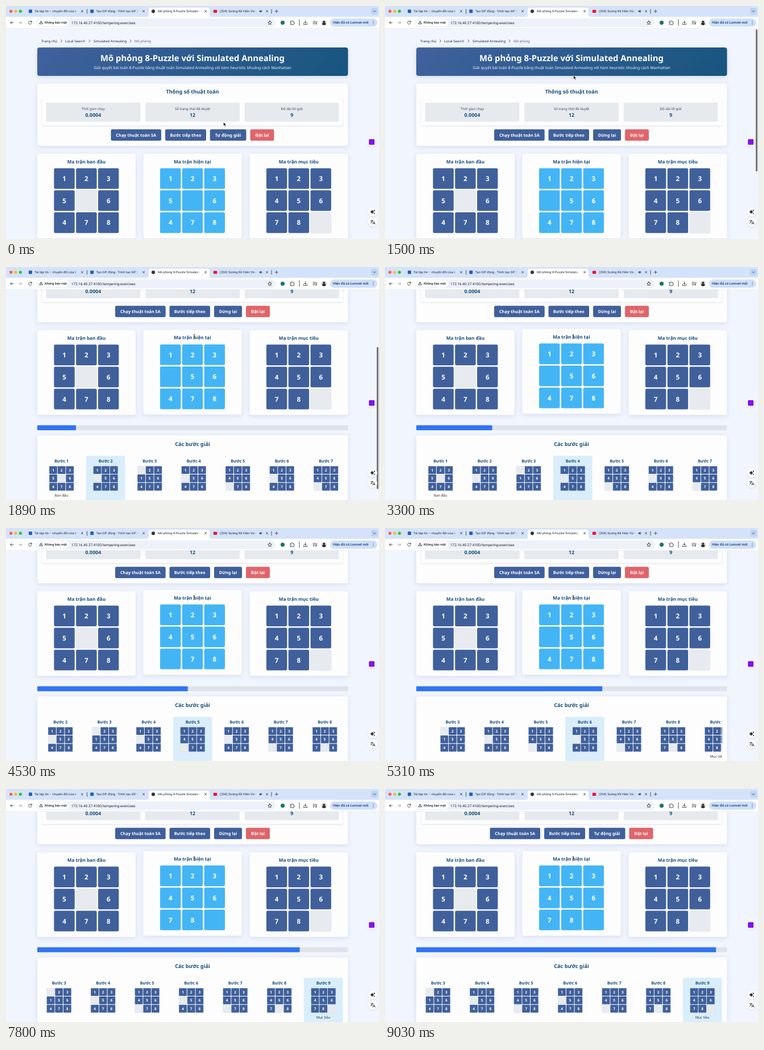
An HTML page for the animation above (9.63 s loop, 656x410 px).

```html
<!DOCTYPE html>
<html lang="vi">
<head>
<meta charset="utf-8">
<title>8-Puzzle</title>
<style>
  html, body { margin: 0; width: 100%; height: 100%; overflow: hidden; background: #f1f5fd; }
  svg { display: block; width: 656px; height: 410px; }
  text { font-family: "Noto Sans", "Open Sans", sans-serif; text-rendering: geometricPrecision; white-space: pre; }
  .ui { font-family: Roboto, Inter, sans-serif; }
  .b { font-weight: 700; }
  .m { font-weight: 500; }
  .card { filter: drop-shadow(0 2px 4px rgba(60, 95, 165, .16)); }
  .soft { filter: drop-shadow(0 1px 1.2px rgba(60, 80, 120, .16)); }
  .line { fill: none; stroke: #3c4043; stroke-width: .9; stroke-linecap: round; stroke-linejoin: round; }
</style>
</head>
<body>
<svg id="stage" viewBox="0 0 656 410" xmlns="http://www.w3.org/2000/svg"></svg>
<script>
const LOOP = 9630, FIRST = 1500, EVERY = 900, GLIDE = 330;
const NAVY = '#40609b', SKY = '#43b5f5', INK = '#174f7c', BLANK = '#e7ebf0';
const STATES = ['123506478', '123056478', '023156478', '123056478', '123456078',
  '123056478', '123456078', '123456708', '123456780'];

const rect = (x, y, w, h, fill, r = 0, more = '') =>
  `<rect x="${x}" y="${y}" width="${w}" height="${h}" rx="${r}" fill="${fill}" ${more}/>`;
const dot = (x, y, r, fill) => `<circle cx="${x}" cy="${y}" r="${r}" fill="${fill}"/>`;
const line = (d, more = '') => `<path class="line" d="${d}" ${more}/>`;
const text = (x, y, str, size, fill, cls = '', anchor = 'middle', more = '') =>
  `<text x="${x}" y="${y}" font-size="${size}" fill="${fill}" class="${cls}" text-anchor="${anchor}" ${more}>${str}</text>`;

// 3x3 board whose top-left corner is x, y
function board(x, y, state, size, pitch, font, fill, live) {
  return [...state].map((d, i) => {
    const tx = x + (i % 3) * pitch, ty = y + Math.floor(i / 3) * pitch;
    const blank = d === '0' && !live;
    const edge = blank ? `stroke="#c9d0da" stroke-width=".5" stroke-dasharray="1.4 .9"` : '';
    return rect(tx, ty, size, size, blank ? BLANK : fill, size / 16, edge) +
      text(tx + size / 2, ty + size / 2 + font * .36, d === '0' ? '' : d, font, '#fff',
        'b' + (live ? ' live' : ''));
  }).join('');
}

function boardCard(cx, title, state, fill, live) {
  return rect(cx - 86.6, 260, 173.2, 149, '#fdfdfe', 4, 'class="card"') +
    text(cx, 276.7, title, 8.17, INK, 'b') +
    board(cx - 57, 285.4, state, 36.4, 38.8, 11.6, fill, live);
}

function stat(x, label, value) {
  return rect(x, 170, 165.8, 33.5, '#e6eaef', 2) +
    text(x + 82.9, 183, label, 6, '#444b55') + text(x + 82.9, 195.2, value, 8.8, INK, 'b');
}

function buttons(id, spans, third) {
  const labels = ['Chạy thuật toán SA', 'Bước tiếp theo', third, 'Đặt lại'];
  return `<g id="${id}">` + spans.map(([x, w], i) =>
    rect(x, 217, w, 20, i === 3 ? '#e0656b' : NAVY, 2.3) +
    text(x + w / 2, 229.7, labels[i], 7.4, '#fff', 'b')).join('') + '</g>';
}

function stepItem(state, i) {
  const cx = 97.7 + 77.5 * i, note = { 0: 'Ban đầu', 8: 'Mục tiêu' }[i] || '';
  return rect(cx - 34.3, 481, 68.6, 86, '#d9eefa', 3, 'class="mark"') +
    text(cx, 493.2, 'Bước ' + (i + 1), 7.25, INK, 'b') +
    board(cx - 21.5, 499.2, state, 13.7, 14.65, 6.5, NAVY) +
    text(cx, 553, note, 6.1, '#333');
}

function page() {
  const crumbs = [[62, 'Trang chủ'], [104, 'Local Search'], [154, 'Simulated Annealing'], [226, 'Mô phỏng']];
  return crumbs.map(([x, s], i) => text(x, 63.7, s, 6, i < 3 ? '#1c2a3a' : '#5b6673', '', 'start')).join('') +
    [97.5, 147, 219].map(x => line(`M${x - 1} 59.4l2 2.1-2 2.1`, 'stroke-width=".7"')).join('') +
    rect(55, 73, 546.5, 50, 'url(#head)', 4, 'class="card"') +
    text(328, 97, 'Mô phỏng 8-Puzzle với Simulated Annealing', 14.85, '#fff', 'b') +
    text(328, 111.3, 'Giải quyết bài toán 8-Puzzle bằng thuật toán Simulated Annealing với hàm heuristic khoảng cách Manhattan', 6.85, '#eef3fa') +
    rect(55, 136.5, 546.5, 109.5, '#fdfdfe', 4, 'class="card"') +
    text(328, 154.4, 'Thông số thuật toán', 9.18, INK, 'b') +
    rect(63.6, 163, 529, 47.5, '#fdfdfe', 3, 'class="soft"') +
    stat(70.5, 'Thời gian chạy', '0.0004') + stat(245.2, 'Số trạng thái đã duyệt', '12') +
    stat(419.8, 'Độ dài lời giải', '9') +
    buttons('idle', [[184.5, 88.5], [280, 72], [358.7, 63.8], [429.5, 42]], 'Tự động giải') +
    buttons('busy', [[192, 88.7], [287.5, 71.5], [366, 49], [422, 42]], 'Dừng lại') +
    boardCard(141.4, 'Ma trận ban đầu', STATES[0], NAVY) +
    '<g id="now">' + boardCard(328, 'Ma trận hiện tại', STATES[0], SKY, true) + '</g>' +
    boardCard(514.9, 'Ma trận mục tiêu', STATES[8], NAVY) +
    rect(55, 427.3, 546.5, 8.8, '#dfe3e9', 1) + rect(55, 427.3, 0, 8.8, '#3074f3', 1, 'id="bar"') +
    rect(55, 445, 546.5, 150, '#fdfdfe', 4, 'class="card"') +
    text(328, 463.6, 'Các bước giải', 9.2, INK, 'b') +
    '<g clip-path="url(#listBox)"><g id="list">' + STATES.map(stepItem).join('') + '</g></g>';
}

function tab(icon, x, width, str, close) {
  return icon + text(x, 11.2, str, 5.7, '#2b3038', 'ui', 'start', `clip-path="inset(0 0 0 0)"`) +
    line(`M${close - 1.6} 7.6l3.2 3.2m0-3.2l-3.2 3.2`, 'stroke-width=".7"');
}

function browser() {
  const strip = '#d5e3fa';
  const fade = (x, id) => rect(x, 4, 8, 11, `url(#${id})`);
  return rect(0, 0, 656, 19, strip) +
    dot(8.7, 9.2, 2.7, '#fe5f57') + dot(17, 9.2, 2.7, '#febc2e') + dot(25.4, 9.2, 2.7, '#28c840') +
    tab(rect(40, 6.3, 6, 6, '#2460b8', 1), 50, 76, 'Tải tập tin – chuyển đổi của b', 134) +
    rect(127, 4, 4.5, 11, strip) + fade(119, 'fadeA') +
    line('M142.5 6v7', 'stroke-width=".5"') +
    tab(rect(148.2, 6.3, 6, 6, '#2460b8', 1), 158.5, 74, 'Tạo GIF động - Trình tạo GIF t', 242) +
    rect(234, 4, 5, 11, strip) + fade(226, 'fadeA') +
    '<path d="M247 19.5q4 0 4-4V7q0-4 4-4h99q4 0 4 4v8.500q0 4 4 4z" fill="#fff"/>' +
    tab(dot(259, 9.3, 3.1, '#34383d'), 267, 74, 'Mô phỏng 8-Puzzle Simulated', 351) +
    rect(342, 4, 6, 11, '#fff') + fade(334, 'fadeB') +
    tab(rect(364.8, 6.7, 6.4, 5.2, '#f0142f', 1), 376, 64, '(204) Sương Kề Hiên Vắng Lặ', 459) +
    rect(441, 4, 15, 11, strip) + fade(433, 'fadeA') +
    '<path d="M445.500 8.200h1.300l1.700-1.500v5l-1.700-1.500h-1.300z" fill="#3c4043"/>' + line('M449.600 7.800q1.200 1.400 0 2.800', 'stroke-width=".6"') +
    line('M467 6v7', 'stroke-width=".4"') + line('M473.300 9.200h5M475.800 6.700v5', 'stroke-width=".8"') +
    rect(642, 3.2, 12, 12, '#bdd3f6', 4) + line('M646 8.300l2 2 2-2') +
    rect(0, 19, 656, 20.5, '#fff') + rect(0, 39.2, 656, .5, '#dde3ec') +
    line('M12.800 29.300h-5m2.200-2.300l-2.300 2.300 2.300 2.300') +
    line('M22.500 29.300h5m-2.200-2.300l2.300 2.300-2.300 2.300', 'style="stroke:#9a9ea4"') +
    line('M45 28a2.800 2.800 0 1 0 .1 2.300M45.200 26.200v2h-2') +
    rect(53, 21.700, 421, 15.300, '#ecf1fa', 7.6) + rect(55, 23.2, 56, 12.2, '#fff', 6) +
    line('M61.800 26.600l2.700 4.800h-5.400zM61.800 28.300v1.300', 'stroke-width=".7"') +
    text(68, 31.4, 'Không bảo mật', 5.75, '#23272c', 'ui m', 'start') +
    text(115, 31.6, '172.16.40.27:4100/tempering-exercises', 6.35, '#23272c', 'ui', 'start') +
    line('M464 26l1 2.200 2.400.3-1.800 1.600.5 2.400-2.100-1.200-2.100 1.200.5-2.400-1.800-1.600 2.400-.3z', 'stroke-width=".7"') +
    dot(486.5, 29.3, 3.6, '#17796a') +
    line('M500.300 27.300h1.700q0-1.500 1.200-1.500t1.200 1.500h1.700v1.700q1.400 0 1.400 1.100t-1.400 1.100v1.600h-5.800v-1.700q1.400 0 1.400-1t-1.400-1z') +
    line('M516 24v10.500', 'stroke-width=".4"') +
    line('M526.500 25.800v4.400m-2-1.900l2 2 2-2M523.400 30.500v2h6.200v-2') +
    line('M540 27h5M540 29.300h4M540 31.600h2.500M546 31.300v-3.500h1.200') + dot(545.2, 31.5, 1.1, '#3c4043') +
    dot(559.3, 29.3, 4.4, '#c9c3c4') + dot(559.3, 27.9, 1.8, '#25252b') +
    '<path d="M556 32.200q0-2.600 3.300-2.600t3.300 2.600q-3.300 2.900-6.600 0z" fill="#25252b"/>' +
    rect(570, 22, 83, 14.6, '#cfe0fb', 7.3) +
    text(575, 31.4, 'Hiện đã có Lomvet mới', 6.05, '#163a72', 'ui m', 'start') +
    [26.8, 29.3, 31.8].map(y => dot(646, y, .65, '#163a72')).join('');
}

function floats() {
  return rect(636, 232, 14.5, 14.5, '#fff', 4, 'class="soft"') + rect(638.2, 234.2, 10, 10, '#8212f2', 1.5) +
    `<g class="soft">${dot(645, 362.3, 8, '#fff')}${dot(645, 380.3, 8, '#fff')}</g>` +
    '<path d="M644 358.300q.6 3 3.600 3.900-3 .9-3.600 3.900-.6-3-3.600-3.900 3-.9 3.600-3.900zM647.700 358q.3 1.400 1.700 1.700-1.400.3-1.700 1.700-.3-1.400-1.700-1.700 1.400-.3 1.700-1.700zM647.700 363.400q.3 1.200 1.500 1.500-1.200.3-1.500 1.500-.3-1.200-1.500-1.500 1.200-.3 1.500-1.500z" fill="#222"/>' +
    line('M641 377.800h5M643.500 376.600v1.200M645 377.800q-.8 2.800-3.700 4.300M642.300 379.500q.8 1.500 2.300 2.300', 'stroke-width=".8"') +
    line('M645.200 384l2-4.700 2 4.700M646 382.600h2.400', 'stroke-width=".8"');
}

const grad = (id, color) => `<linearGradient id="${id}"><stop stop-color="${color}" stop-opacity="0"/><stop offset="1" stop-color="${color}"/></linearGradient>`;

const stage = document.getElementById('stage');
stage.innerHTML = `<defs>
  <linearGradient id="head" gradientUnits="userSpaceOnUse" x1="180" y1="-50" x2="476" y2="246">
    <stop stop-color="#41619e"/><stop offset="1" stop-color="#17557f"/></linearGradient>
  ${grad('fadeA', '#d5e3fa')}${grad('fadeB', '#fff')}
  <clipPath id="listBox"><rect x="63.500" y="475" width="529.5" height="110"/></clipPath></defs>` +
  rect(0, 0, 656, 410, '#f1f5fd') + '<g id="page">' + page() + '</g>' +
  rect(652, 41, 3, 250, '#747679', 1.5, 'id="thumb"') + floats() + browser() +
  `<path id="arrow" d="M0 0v6.600l1.600-1.400 1.100 2.500 1.200-.5-1.100-2.500h2.100z" fill="#111" stroke="#fff" stroke-width=".5"/>
  <path id="beam" class="line" d="M329.800 118.800q1.400 0 1.400 1 0-1 1.400-1M331.200 119.800v5.400M329.800 126.200q1.400 0 1.400-1 0 1 1.400 1" style="stroke:#222;stroke-width:.7"/>`;

const $ = id => document.getElementById(id);
const marks = [...stage.querySelectorAll('.mark')], digits = [...stage.querySelectorAll('.live')];
const clamp = (v, lo = 0, hi = 1) => Math.min(hi, Math.max(lo, v));
const span = (t, a, b) => clamp((t - a) / (b - a));
const smooth = u => u * u * (3 - 2 * u);
const easeOut = u => 1 - (1 - u) ** 3;
const mix = (a, b, u) => a + (b - a) * u;
const show = (el, on) => el.setAttribute('visibility', on ? 'visible' : 'hidden');
const move = (el, x, y) => el.setAttribute('transform', `translate(${x} ${y})`);
const listShift = i => clamp(97.5 + 77.5 * i - 328, 0, 159.5);
const barWidth = i => 2.4 + 65.6 * i;

function render(t) {
  const step = t < FIRST ? 0 : Math.min(8, 1 + Math.floor((t - FIRST) / EVERY));
  const began = FIRST + (step - 1) * EVERY, prev = Math.max(0, step - 1);
  const glide = span(t, began, began + GLIDE);
  $('bar').setAttribute('width', mix(barWidth(prev), barWidth(step), easeOut(glide)));
  move($('list'), -mix(listShift(prev), listShift(step), smooth(glide)), 0);
  marks.forEach((m, i) => show(m, i === step));
  digits.forEach((d, i) => { d.textContent = STATES[step][i].replace('0', ''); });

  const running = t >= 600 && t < 8700;
  show($('busy'), running);
  show($('idle'), !running);

  const scroll = 148.8 * smooth(span(t, 1500, 1885));
  move($('page'), 0, -scroll);
  move($('now'), 0, -2 * smooth(span(t, 1800, 2100)));
  move($('thumb'), 0, scroll * .67);
  $('thumb').setAttribute('opacity', t < FIRST ? 0 : 1 - span(t, 2490, 2850));

  const toButton = smooth(span(t, 30, 560)), toRest = smooth(span(t, 780, 1050));
  move($('arrow'), mix(mix(382.6, 389, toButton), 331.6, toRest), mix(mix(204.5, 226, toButton), 122.3, toRest));
  const overText = scroll > 142;
  show($('arrow'), !overText);
  show($('beam'), overText);
}

let start;
function tick(now) {
  start ??= now;
  render((now - start) % LOOP);
  requestAnimationFrame(tick);
}
render(0);
requestAnimationFrame(tick);
</script>
</body>
</html>
```
